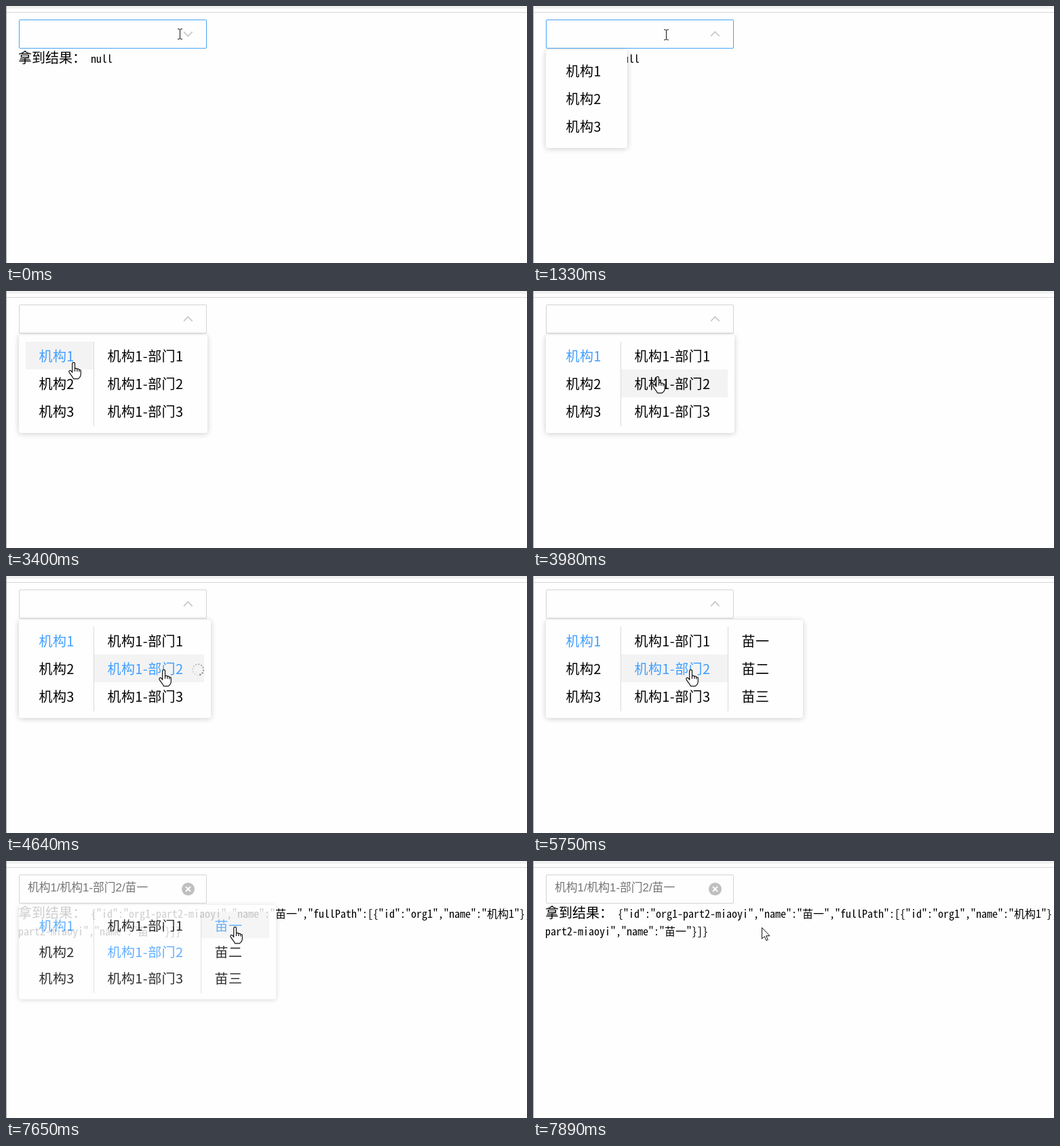
An HTML page for the animation above (8 s loop, 768x380 px).

```html
<!DOCTYPE html>
<html lang="zh-CN">
<head>
<meta charset="utf-8">
<title>Cascader</title>
<style>
  html, body { margin: 0; width: 100%; height: 100%; overflow: hidden; background: #fefefe; }
  #stage { position: relative; width: 768px; height: 380px; overflow: hidden; color: #000;
    font-family: "Noto Sans CJK SC", "Noto Sans CJK JP", "Noto Sans CJK", sans-serif; }
  #stage div, #stage svg { position: absolute; box-sizing: border-box; white-space: pre; }
  #stage svg { overflow: visible; left: 0; top: 0; width: 1px; height: 1px; }
  .strip { left: 0; top: 0; width: 768px; height: 4px; background: #f1f1f1; }
  .line { left: 0; top: 9px; width: 768px; height: 1px; background: #d6d6d6; }
  .edge { left: 0; top: 0; width: 1px; height: 380px; background: #a2a2a2; }
  #input { left: 19px; top: 20px; width: 277px; height: 43px; border: 1px solid #d4d4d4;
    border-radius: 2px; background: #fefefe; }
  #input.hover { border-color: #47a4f5; }
  #caret { left: 32px; top: 32px; width: 1px; height: 19px; background: #000; }
  #display { left: 32px; top: 18px; line-height: 43px; color: #757575;
    font-family: "Liberation Sans", "Noto Sans CJK SC", "Noto Sans CJK JP", sans-serif; font-size: 16.8px; }
  .label { left: 18px; top: 56px; font-size: 20px; line-height: 40px; }
  .code { font: 16px/20px "Noto Sans Mono CJK SC", "Noto Sans Mono CJK JP", monospace; }
  #panel { left: 19px; top: 65px; height: 145px; border-radius: 4px; background: #fefefe;
    box-shadow: 0 1px 8px rgba(0, 0, 0, .2); transform-origin: 50% 0; }
  .item { height: 41px; padding-left: 19.5px; font-size: 20px; line-height: 41px; letter-spacing: .4px; }
  .item.hover { background: #f3f3f3; }
  .item.active { color: #409eff; }
  .rule { top: 10px; width: 1px; height: 125px; background: #dadada; }
</style>
</head>
<body>
<div id="stage">
  <div class="strip"></div>
  <div class="line"></div>
  <div class="edge"></div>
  <div id="input"></div>
  <div id="caret"></div>
  <div id="display">机构1/机构1-部门2/苗一</div>
  <svg><g id="chevron"><path d="M-6.3 -3.2L0 3.2L6.3 -3.2" fill="none" stroke="#cbcbcb" stroke-width="1.9"/></g>
    <g id="clear" transform="translate(268.5 41.5)"><circle r="9.5" fill="#bfbfbf"/>
    <path d="M-3.5 -3.5L3.5 3.5M3.5 -3.5L-3.5 3.5" stroke="#fff" stroke-width="2"/></g></svg>
  <div class="label">拿到结果：</div>
  <div class="code" id="line1" style="left:125px;top:67px"></div>
  <div class="code" id="line2" style="left:18px;top:93px"></div>
  <div id="panel"></div>
  <svg><g id="spinner"></g></svg>
  <svg><g id="cursor" stroke="#111" stroke-linejoin="round">
    <path id="beam" fill="none" d="M-3.5 -7.5H-1L0 -6.5L1 -7.5H3.5M0 -6.5V6.5M-3.5 7.5H-1L0 6.5L1 7.5H3.5"/>
    <path id="arrow" fill="#fff" d="M0 0V16.5L3.8 13L6.4 19L8.8 18L6.2 12.2H11.5Z"/>
    <path id="hand" fill="#fff" stroke-width="1.2" d="M-1.8 14V1a1.9 1.9 0 0 1 3.8 0V8.5q2.6 -1.6 3.4 .6q2.4 -1.2 3 1q2.4 -.6 2.4 1.8V16.5c0 3.5 -2 5.5 -4 6.8H0C-1.5 20 -4.5 17 -6.5 13.5c-.8 -2.2 1.2 -3.4 2.9 -2zM2 8.5V12.5M5.4 9.1V12.5M8.4 10.1V13"/>
  </g></svg>
</div>
<script>
const LOOP = 8000, OPEN = 110, FADE = 300, DELAY = 1000;
const CLICKS = [2100, 4300, 6550], PICKED = [0, 1, 0];
const DONE = CLICKS[2] + DELAY;
const COLS = [
  { x: 29, right: 129, wide: 130, items: ['机构1', '机构2', '机构3'] },
  { x: 130, right: 287, wide: 292, items: ['机构1-部门1', '机构1-部门2', '机构1-部门3'] },
  { x: 288, right: 388, wide: 388, items: ['苗一', '苗二', '苗三'] }
];
// cursor moves: start, end, target x, target y
const MOVES = [[300, 800, 196.5, 42], [1650, 2030, 99.5, 106], [3650, 4200, 232, 139.5], [5800, 6400, 337, 98.5]];
// bursts of screen refreshes: first, last, count
const BURSTS = [[150, 870, 6], [1330, 1330, 1], [1700, 2650, 8], [2800, 3400, 5],
  [3710, 4640, 8], [4790, 5750, 8], [5900, 6870, 8], [6990, 7890, 8]];

const $ = id => document.getElementById(id);
const show = (el, on) => { el.style.visibility = on ? 'visible' : 'hidden'; };
const clamp = v => Math.max(0, Math.min(1, v));
const ease = v => { v = clamp(v); return v * v * (3 - 2 * v); };
const add = (cls, parent, text = '') => {
  const el = document.createElement('div');
  el.className = cls;
  el.textContent = text;
  return parent.appendChild(el);
};

COLS.forEach((col, c) => {
  col.els = col.items.map((text, r) => {
    const el = add('item', $('panel'), text);
    el.style.left = col.x - 19 + 'px';
    el.style.top = 10 + r * 41 + 'px';
    return el;
  });
  if (c) {
    col.rule = add('rule', $('panel'));
    col.rule.style.left = col.x - 20 + 'px';
  }
});

const DOTS = 12;
for (let i = 0; i < DOTS; i++) {
  const a = -i * 2 * Math.PI / DOTS, f = 1 - i / DOTS;
  const dot = document.createElementNS('http://www.w3.org/2000/svg', 'circle');
  dot.setAttribute('cx', 8 * Math.cos(a));
  dot.setAttribute('cy', 8 * Math.sin(a));
  dot.setAttribute('r', .7 + .6 * f);
  dot.setAttribute('fill', `rgba(120,120,120,${.25 + .6 * f})`);
  $('spinner').appendChild(dot);
}

function sample(t) {
  let s = 0;
  for (const [a, b, n] of BURSTS) {
    if (t < a) break;
    const step = n > 1 ? (b - a) / (n - 1) : 1;
    s = a + step * Math.min(n - 1, Math.floor((t - a) / step + .001));
  }
  return s;
}

function cursorAt(t) {
  let x = 256.5, y = 41;
  for (const [a, b, tx, ty] of MOVES) {
    const k = ease((t - a) / (b - a));
    x += (tx - x) * k;
    y += (ty - y) * k;
  }
  return [x, y];
}

function render(t) {
  const done = t >= DONE;
  const [x, y] = cursorAt(t);
  const inInput = x > 19 && x < 296 && y > 20 && y < 63;
  const count = 1 + CLICKS.slice(0, 2).filter(c => t >= c + DELAY).length;
  const loading = CLICKS.findIndex(c => t >= c && t < c + DELAY);
  const visible = t >= OPEN && t < DONE + FADE;
  const rightOf = c => c === loading ? COLS[c].wide : COLS[c].right;

  $('input').className = inInput ? 'hover' : '';
  show($('caret'), (t >= 800 && t < 1330) || (t >= 1860 && t < CLICKS[0]));
  show($('display'), done);
  show($('clear'), done);
  show($('chevron'), !done);
  const turn = 180 * ease((t - OPEN) / 200);
  $('chevron').setAttribute('transform', `translate(268.4 41.4) rotate(${turn})`);

  $('line1').textContent = done
    ? '{"id":"org1-part2-miaoyi","name":"苗一","fullPath":[{"id":"org1","name":"机构1"},'
    : 'null';
  $('line2').textContent = done ? 'part2-miaoyi","name":"苗一"}]}' : '';

  const k = done ? 1 - ease((t - DONE) / FADE) : ease((t - OPEN) / FADE);
  const panel = $('panel');
  panel.style.display = visible ? 'block' : 'none';
  panel.style.opacity = k;
  panel.style.transform = `scaleY(${.8 + .2 * k})`;
  panel.style.width = rightOf(count - 1) + 10 - 19 + 'px';

  let onItem = false;
  COLS.forEach((col, c) => {
    const shown = c < count, right = rightOf(c);
    if (col.rule) col.rule.style.display = shown ? 'block' : 'none';
    col.els.forEach((el, r) => {
      const top = 75 + r * 41;
      const hover = visible && shown && x >= col.x && x < right && y >= top && y < top + 41;
      onItem = onItem || hover;
      el.style.display = shown ? 'block' : 'none';
      el.style.width = right - col.x + 'px';
      el.classList.toggle('hover', hover);
      el.classList.toggle('active', t >= CLICKS[c] && r === PICKED[c]);
    });
  });

  show($('spinner'), loading >= 0);
  if (loading >= 0) {
    const cx = rightOf(loading) - 8.8, cy = 97.5 + 41 * PICKED[loading];
    const spin = -55 + .36 * (t - CLICKS[loading]);
    $('spinner').setAttribute('transform', `translate(${cx} ${cy}) rotate(${spin})`);
  }

  const kind = inInput ? 'beam' : onItem ? 'hand' : 'arrow';
  for (const id of ['beam', 'hand', 'arrow']) show($(id), id === kind);
  const snap = v => Math.floor(v) + .5;
  $('cursor').setAttribute('transform', `translate(${snap(x)} ${snap(y)})`);
}

const start = performance.now();
function tick() {
  render(sample((performance.now() - start) % LOOP));
  requestAnimationFrame(tick);
}
tick();
</script>
</body>
</html>
```
